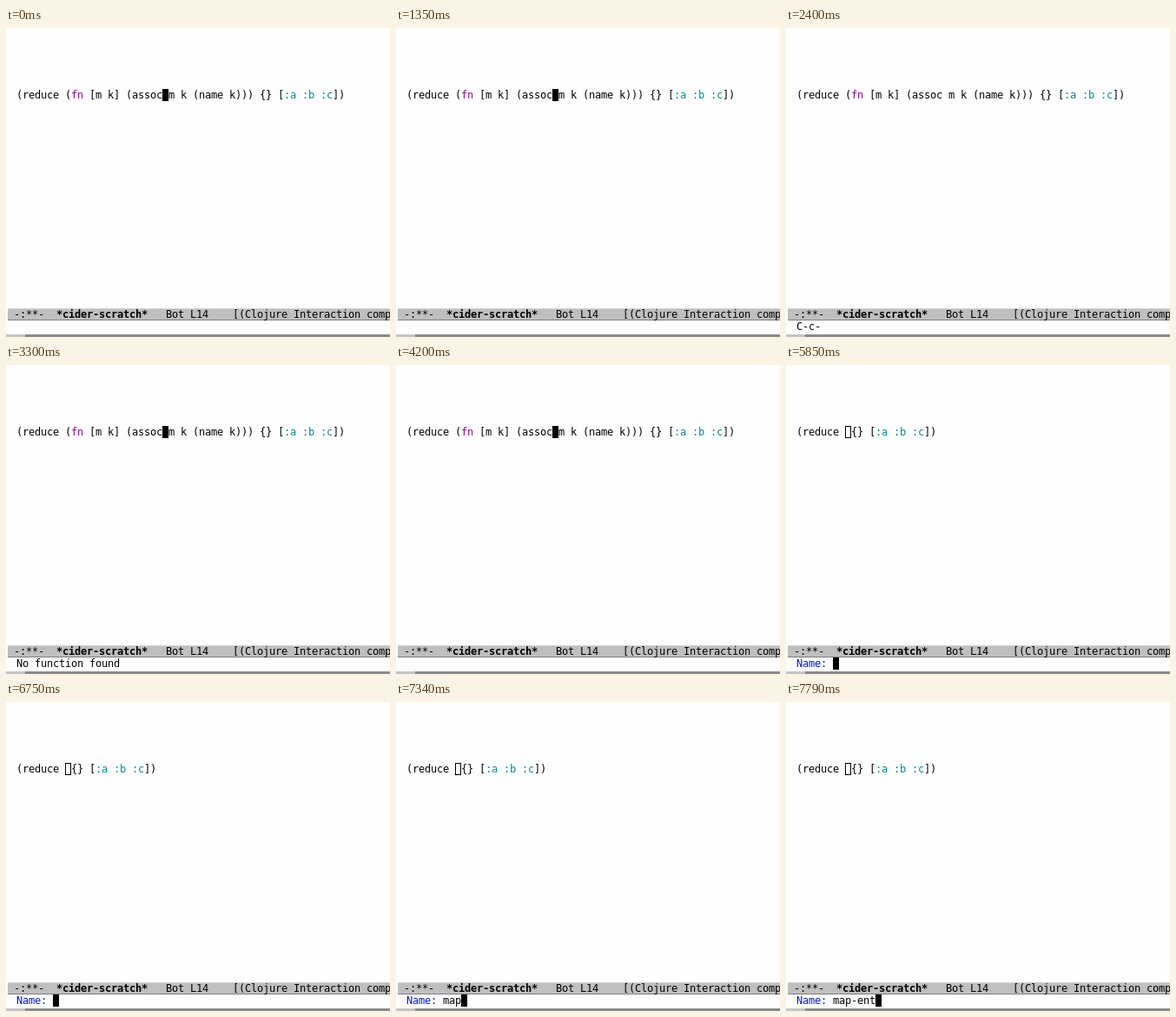
Recreate the animation shown at these times as an HTML page with a canvas. Size 442 by 355 pixels, loop 8000 ms.

```html
<!DOCTYPE html>
<html lang="en">
<head>
<meta charset="utf-8">
<title>Editor session</title>
<style>
  html, body { margin: 0; width: 100%; height: 100%; overflow: hidden; background: #fefefe; }
  canvas { display: block; }
</style>
</head>
<body>
<canvas id="stage" width="442" height="355"></canvas>
<script>
const ctx = document.getElementById("stage").getContext("2d");
const LOOP = 8000;
const CELL = 7, LINE = 14, ASCENT = 11;
const LEFT = 12, CODE_TOP = 70, MODE_TOP = 322, ECHO_TOP = 336;
const BLACK = "#000", PURPLE = "#8b108b", TEAL = "#008b8b", BLUE = "#0018cf";

const EXTRACT_AT = 5700, PROMPT_AT = 5850;

// Times at which the block cursor in the code toggles, starting visible.
const BLINKS = [450, 900, 1500, 1950, 2400, 3000, 3450, 3900, 4500, 4950, 5400];

const ECHO = [
  [0, ""], [450, "C-c-"], [1350, ""], [1800, "No function found"],
  [2400, "C-c-"], [2700, "C-c RET-"], [3300, "No function found"], [4200, ""],
  [4650, "C-c RET-"], [5250, "C-c RET p-"], [5400, ""]
];

const TYPED = [
  [0, ""], [6900, "m"], [7040, "ma"], [7340, "map"],
  [7490, "map-"], [7640, "map-en"], [7790, "map-ent"]
];

const KEYWORDS = [[":a", TEAL], [" "], [":b", TEAL], [" "], [":c", TEAL], ["])"]];
const FULL_CODE = [["(reduce ("], ["fn", PURPLE], [" [m k] (assoc m k (name k))) {} ["], ...KEYWORDS];
const SHORT_CODE = [["(reduce  {} ["], ...KEYWORDS];

const valueAt = (steps, t) => steps.filter(([start]) => start <= t).pop()[1];

function rect(x, y, w, h, color) {
  ctx.fillStyle = color;
  ctx.fillRect(x, y, w, h);
}

// Writes text on the character grid and returns the x after it.
function write(text, x, top, color = BLACK, weight = "normal") {
  ctx.font = `${weight} 12px "DejaVu Sans Mono", monospace`;
  ctx.fillStyle = color;
  for (const char of text) {
    ctx.fillText(char, x, top + ASCENT);
    x += CELL;
  }
  return x;
}

function writeCode(parts) {
  let x = LEFT;
  for (const [text, color] of parts) x = write(text, x, CODE_TOP, color);
}

function blockCursor(x, top) {
  rect(x, top, CELL, LINE, BLACK);
}

function drawCode(t) {
  if (t < EXTRACT_AT) {
    writeCode(FULL_CODE);
    const toggles = BLINKS.filter(time => time <= t).length;
    if (toggles % 2 === 0) blockCursor(LEFT + 24 * CELL, CODE_TOP);
  } else {
    writeCode(SHORT_CODE);
    ctx.strokeStyle = BLACK;
    ctx.strokeRect(LEFT + 8 * CELL + 0.5, CODE_TOP + 0.5, CELL - 1, LINE - 1);
  }
}

function drawModeLine() {
  rect(2, MODE_TOP, 440, LINE, "#bfbfbf");
  rect(2, MODE_TOP, 440, 1, "#d2d2d2");
  rect(2, MODE_TOP + LINE - 1, 440, 1, "#7f7f7f");
  let x = write("-:**-  ", 9, MODE_TOP);
  x = write("*cider-scratch*", x, MODE_TOP, BLACK, "bold");
  write("   Bot L14    [(Clojure Interaction comp", x, MODE_TOP);
}

function drawEchoArea(t) {
  if (t < EXTRACT_AT) {
    write(valueAt(ECHO, t), LEFT, ECHO_TOP);
    return;
  }
  let x = write("Name: ", LEFT, ECHO_TOP, BLUE);
  x = write(valueAt(TYPED, t), x, ECHO_TOP);
  const visible = t >= PROMPT_AT && !(t >= 6300 && t < 6750);
  if (visible) blockCursor(x, ECHO_TOP);
}

function drawWindowEdge() {
  rect(0, 352, 442, 3, "#8a8a8a");
  rect(0, 352, 22, 3, "#c4c4c4");
}

function frame(now) {
  const t = now % LOOP;
  rect(0, 0, 442, 355, "#fefefe");
  drawCode(t);
  drawModeLine();
  drawEchoArea(t);
  drawWindowEdge();
  requestAnimationFrame(frame);
}

requestAnimationFrame(frame);
</script>
</body>
</html>
```
